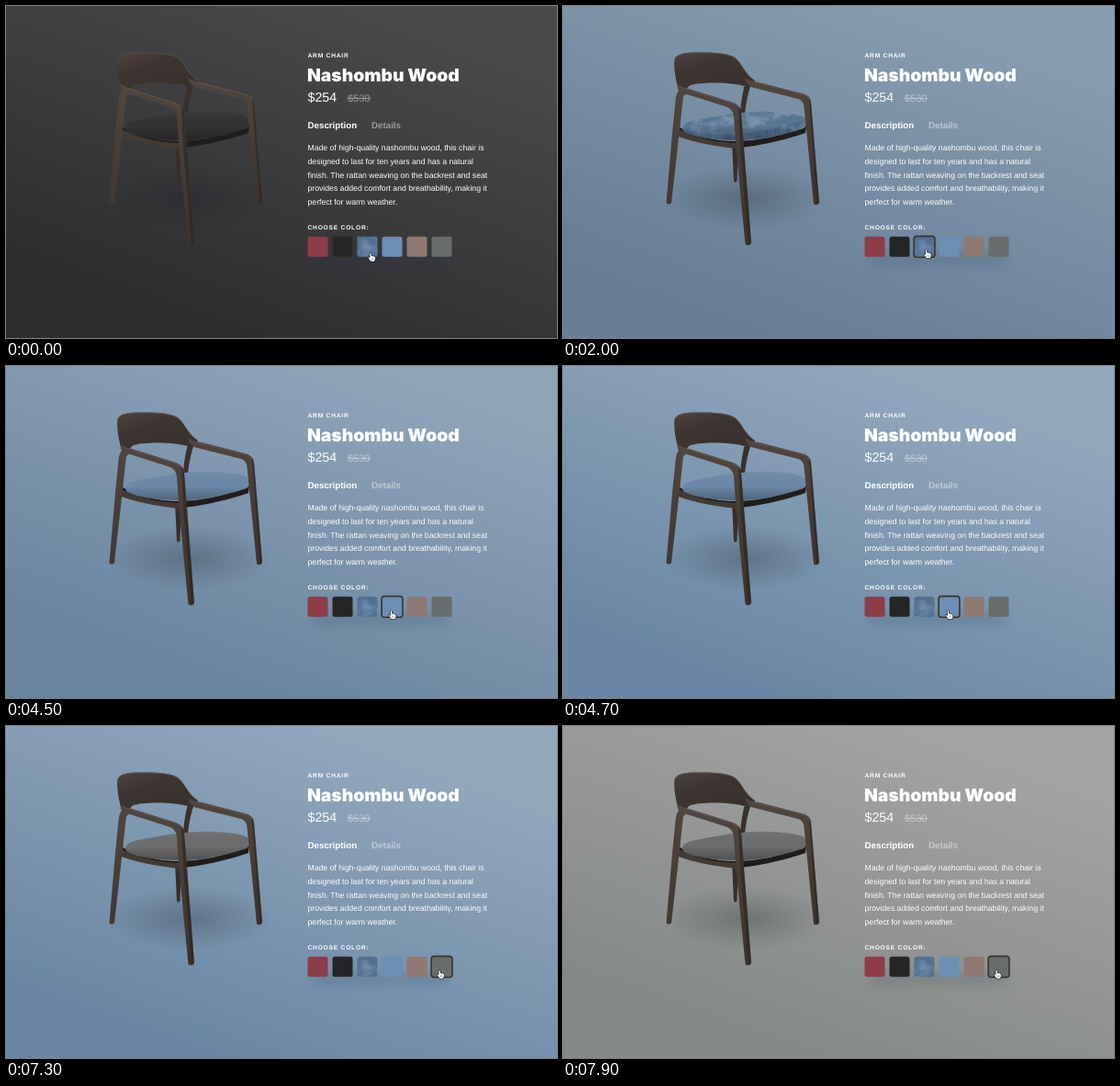
Write an HTML page that moves like this. It is 600 px wide and 361 px high and loops after 8000 ms.

```html
<!DOCTYPE html>
<html lang="en">
<head>
<meta charset="utf-8">
<title>Arm chair</title>
<style>
  html, body { margin: 0; width: 100%; height: 100%; overflow: hidden; background: #3a3a3c; }
  svg { display: block; width: 100vw; height: 100vh; }
  text { font-family: "Liberation Sans", Arial, sans-serif; fill: #fff; text-rendering: geometricPrecision; }
  .label { font-size: 6.67px; font-weight: 700; letter-spacing: .77px; }
  .title { font: 900 19.3px Inter, sans-serif; }
  .price { font-size: 14.2px; }
  .tab { font-size: 9.75px; font-weight: 700; }
  .body { font-size: 8.67px; }
  .faded { opacity: .46; }
</style>
</head>
<body>
<svg viewBox="0 0 600 361" preserveAspectRatio="none">
  <defs>
    <linearGradient id="backdrop" gradientUnits="userSpaceOnUse" x1="375" y1="0" x2="245" y2="361">
      <stop id="bgTop"/><stop id="bgBottom" offset="1"/>
    </linearGradient>
    <radialGradient id="floor">
      <stop stop-color="#16181c" stop-opacity=".25"/>
      <stop offset=".5" stop-color="#16181c" stop-opacity=".12"/>
      <stop offset="1" stop-color="#16181c" stop-opacity="0"/>
    </radialGradient>
    <linearGradient id="back" x2=".7" y2="1">
      <stop stop-color="#4c433e"/><stop offset=".4" stop-color="#3d3531"/><stop offset="1" stop-color="#39302c"/>
    </linearGradient>
    <linearGradient id="wood" x2="0" y2="1">
      <stop stop-color="#51463f"/><stop offset="1" stop-color="#3c322d"/>
    </linearGradient>
    <linearGradient id="shade" x2="0" y2="1">
      <stop stop-color="#fff" stop-opacity=".06"/><stop offset=".5" stop-color="#000" stop-opacity="0"/>
      <stop offset="1" stop-color="#000" stop-opacity=".3"/>
    </linearGradient>
    <pattern id="weave" width="2" height="2" patternUnits="userSpaceOnUse" patternTransform="rotate(12)">
      <path d="M0 .5H1M1 1.5H2" stroke="#fff" stroke-opacity=".13"/>
      <path d="M1 .5H2" stroke="#000" stroke-opacity=".13"/>
    </pattern>
    <pattern id="ribs" width="2.2" height="10" patternUnits="userSpaceOnUse">
      <path d="M.6 0V10" stroke="#1f344c" stroke-opacity=".6" stroke-width=".8"/>
    </pattern>
    <filter id="blotch" x="0" y="0" width="1" height="1">
      <feTurbulence type="fractalNoise" baseFrequency=".07 .1" numOctaves="3" seed="8"/>
      <feColorMatrix values="0 0 0 0 .68  0 0 0 0 .78  0 0 0 0 .88  3 0 0 0 -1.25"/>
    </filter>
    <filter id="soft" x="-.3" y="-1.5" width="1.6" height="4"><feGaussianBlur stdDeviation="6"/></filter>
    <clipPath id="seatClip"><path id="seatShape" d="M130.500 131C132 126 145 123.500 158 121.500C178 117.500 205 114 225 115C245 116 262 118 264 123C266 128 265 131 262 133C245 139 218 145 194 146C168 146 142 143 132 137C130 135 130 133 130.500 131Z"/></clipPath>
  </defs>

  <rect width="600" height="361" fill="url(#backdrop)"/>

  <g id="chair">
    <ellipse cx="200" cy="209" rx="90" ry="35" fill="url(#floor)"/>
    <path d="M184 148H191L189.500 190Q187.500 193 186 190Z" fill="#362e2a"/>
    <path d="M199 82L205 85Q200 98 198 117H193Q194 98 199 82Z" fill="#3a312c"/>
    <path d="M124 130Q150 147 190 147Q230 146 265 130L264 138Q232 149 194 154Q150 150 123 137Z" fill="#211d1b"/>
    <use href="#seatShape" id="cushion"/>
    <g clip-path="url(#seatClip)">
      <rect id="denimLook" x="126" y="110" width="144" height="40" filter="url(#blotch)" opacity=".28"/>
      <path id="denimRibs" d="M130 134Q160 143 194 139Q235 135 268 122V148H130Z" fill="url(#ribs)"/>
      <rect id="weaveLook" x="126" y="110" width="144" height="40" fill="url(#weave)"/>
      <rect x="126" y="112" width="144" height="36" fill="url(#shade)"/>
    </g>
    <path d="M122 132Q150 148 190 149V155Q147 151 121 140Z" fill="#443a34"/>
    <path d="M121 61C121 54 127 51 142 50.500C163 50 180 51 187 56C195 62 198 75 209 81L206 87Q201 84 197 87C185 83 150 82 138 86.500Q134 89 134 94L126 92C123 82 121 71 121 61Z" fill="url(#back)"/>
    <path d="M121.500 61C122 54.500 127 51.500 142 51C163 50.500 180 51.500 187 56.500C195 62 198 75 209 81" fill="none" stroke="#5f544d" stroke-width=".8"/>
    <path d="M198 78Q204 82 213 83L260 95Q269 97 270 104L279 214Q276 218 273 215L262.500 110Q262 103 256 101L208 89Q200 87 198 78Z" fill="url(#wood)"/>
    <path d="M268 101Q270 103 270 106L279 214L276.500 216Z" fill="#2c2521" opacity=".65"/>
    <path d="M124 84Q128 88 137 90L182 104Q193 107 194 115L197 154L205 258Q202 262 198.500 259L188.500 156L186 120Q185 113 179 110L135 96Q131 95 130.500 102L127 135L118 214Q115 217 112.500 214L119 138L122.500 103Q123 95 126 92Z" fill="url(#wood)"/>
    <path d="M191 109Q194 112 194 117L197 154L205 258L202 260L193 154Z" fill="#2c2521" opacity=".65"/>
    <path d="M128 88Q135 91 182 105Q188 107 190 110M208 83L260 96Q266 97 268 101" fill="none" stroke="#63574f" stroke-width="1" opacity=".75"/>
  </g>

  <text class="label" x="328.500" y="56">ARM CHAIR</text>
  <text class="title" x="328" y="82">Nashombu Wood</text>
  <text class="price" x="328.500" y="104.300">$254</text>
  <g class="faded">
    <text x="372" y="104" font-size="11">$530</text>
    <path d="M371.500 100.500H397" stroke="#fff"/>
    <text class="tab" x="398" y="133.300">Details</text>
  </g>
  <text class="tab" x="328.500" y="133.300">Description</text>
  <g id="copy"></g>
  <text class="label" x="328.500" y="243.300">CHOOSE COLOR:</text>
  <rect x="334" y="268" width="148" height="14" fill="#1c3450" opacity=".15" filter="url(#soft)"/>
  <g id="swatches"></g>

  <g id="cursor">
    <path d="M-1.200 1Q0 -.7 1.200 1V4.200Q2.300 3.400 3 4.500Q4.200 3.900 4.700 5Q6 4.700 6 6.200V8Q6 9.400 5 10.500V11.500H-.2V10.700Q-2 8.800 -3.500 6.600Q-3.300 5 -1.900 5.900L-1.200 6.600Z" fill="#fff" stroke="#111" stroke-width=".8" stroke-linejoin="round"/>
    <path d="M1.400 7V9.500M3 7V9.500" stroke="#333" stroke-width=".5"/>
  </g>
</svg>
<script>
const LOOP = 8000;
const $ = id => document.getElementById(id);
const SVG = "http://www.w3.org/2000/svg";

function add(parent, tag, attrs, text = "") {
  const node = document.createElementNS(SVG, tag);
  for (const key in attrs) node.setAttribute(key, attrs[key]);
  node.textContent = text;
  parent.appendChild(node);
  return node;
}

const lines = [
  "Made of high-quality nashombu wood, this chair is",
  "designed to last for ten years and has a natural",
  "finish. The rattan weaving on the backrest and seat",
  "provides added comfort and breathability, making it",
  "perfect for warm weather."
];
lines.forEach((line, i) => add($("copy"), "text", { class: "body", x: 328.5, y: 157 + i * 14.75 }, line));

const BLACK = 1, DENIM = 2;
const fabrics = ["#8b3340", "#252527", "#506f92", "#668db6", "#8b756c", "#636866"];
const seats = ["#8b3340", "#303032", "#587793", "#6787a8", "#8b756c", "#66686a"];
const borders = fabrics.map((fill, i) => {
  const x = 328.5 + i * 27;
  const box = { x, y: 250.8, width: 22, height: 22, rx: 2.5 };
  add($("swatches"), "rect", { ...box, fill });
  if (i === DENIM) add($("swatches"), "rect", { ...box, filter: "url(#blotch)", opacity: .22 });
  else if (i !== BLACK) add($("swatches"), "rect", { ...box, fill: "url(#weave)", opacity: .8 });
  return add($("swatches"), "rect", {
    x: x - .4, y: 250.4, width: 22.8, height: 22.8, rx: 3, fill: "none", stroke: "#38322f", "stroke-width": 1.6
  });
});

// [time, swatch]
const picks = [[-1000, 1], [1100, 2], [3900, 3], [7100, 5]];
// [time, r, g, b at the top, r, g, b at the bottom]
const dark = [73, 73, 75, 45, 45, 48];
const slate = [135, 156, 176, 102, 126, 150];
const sky = [147, 168, 189, 105, 135, 164];
const grey = [162, 164, 163, 132, 136, 135];
const backdrop = [
  [0, ...dark], [1200, ...dark], [1500, 99, 102, 105, 70, 71, 75], [1800, ...slate],
  [4100, ...slate], [4700, ...sky], [7300, ...sky], [7900, ...grey]
];
// [time, x, y] of the fingertip
const pointer = [
  [0, 397, 268], [300, 397, 268], [800, 395.7, 264.5], [2900, 395.7, 264.5],
  [3500, 419.5, 265.5], [5900, 419.5, 265.5], [6800, 472, 264.8]
];

const clamp = v => Math.min(1, Math.max(0, v));
const smooth = v => v * v * (3 - 2 * v);

function sample(track, t, ease = v => v) {
  const next = track.findIndex(key => key[0] > t);
  if (next < 0) return track[track.length - 1].slice(1);
  const a = track[next - 1], b = track[next];
  const k = ease((t - a[0]) / (b[0] - a[0]));
  return a.slice(1).map((v, i) => v + (b[i + 1] - v) * k);
}

const rgb = c => `rgb(${c.map(Math.round).join()})`;

function draw(t) {
  const bg = sample(backdrop, t);
  $("bgTop").setAttribute("stop-color", rgb(bg.slice(0, 3)));
  $("bgBottom").setAttribute("stop-color", rgb(bg.slice(3)));

  const current = picks.filter(p => p[0] <= t).length - 1;
  const [since, chosen] = picks[current];
  const fade = clamp((t - since) / 150);
  borders.forEach((border, i) => {
    const leaving = current > 0 && i === picks[current - 1][1];
    border.setAttribute("opacity", i === chosen ? fade : leaving ? 1 - fade : 0);
  });

  $("cushion").setAttribute("fill", seats[chosen]);
  const denim = chosen === DENIM;
  $("denimLook").style.display = $("denimRibs").style.display = denim ? "" : "none";
  $("weaveLook").setAttribute("opacity", denim ? 0 : chosen === BLACK ? .25 : .8);

  $("cursor").setAttribute("transform", `translate(${sample(pointer, t, smooth)}) scale(.88)`);
}

const start = performance.now();
function tick() {
  draw((performance.now() - start) % LOOP);
  requestAnimationFrame(tick);
}
tick();
</script>
</body>
</html>
```
